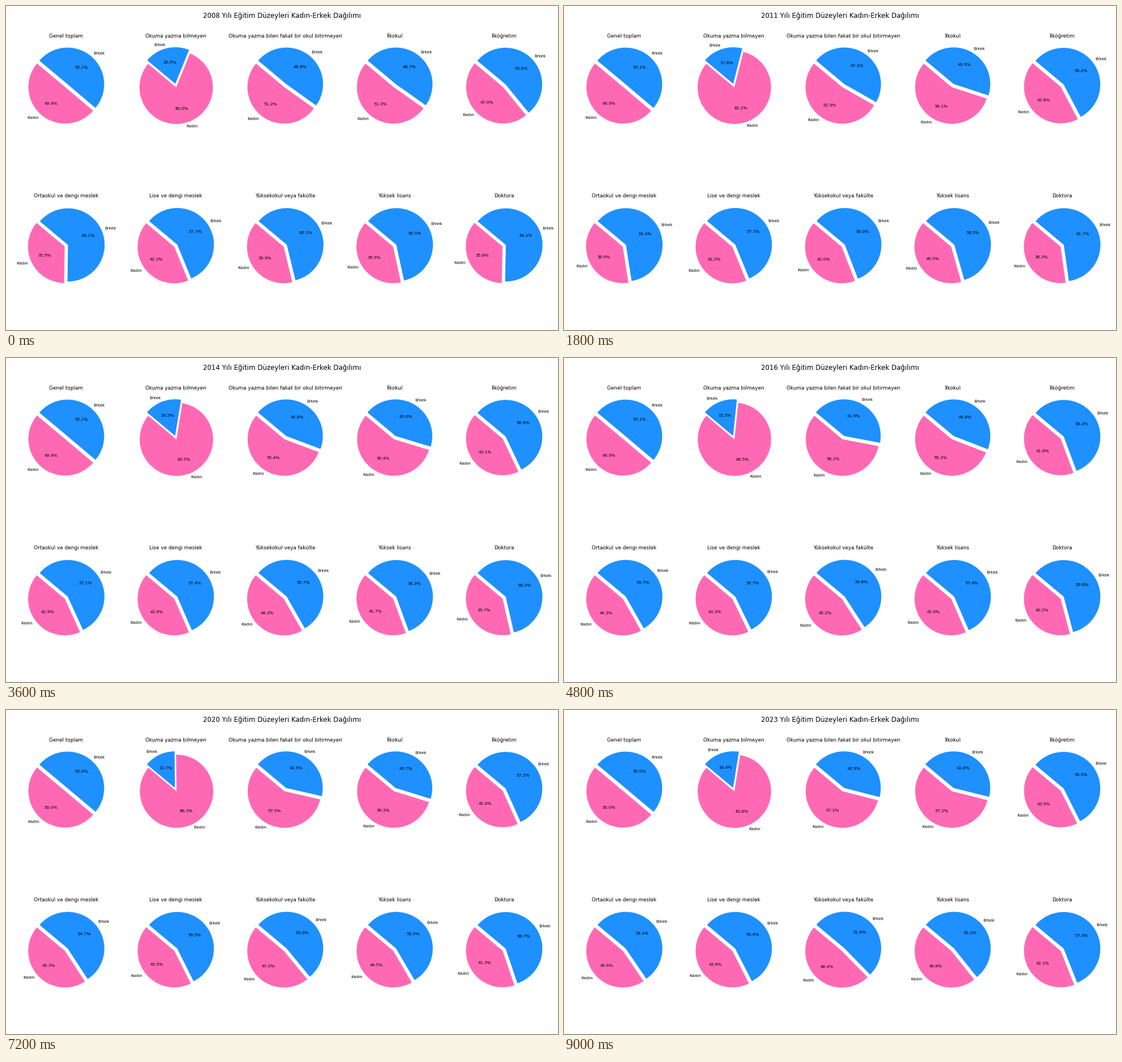
A matplotlib script for the animation above (9.6 s loop, 975x574 px).

```python
import numpy as np
import matplotlib.pyplot as plt
from matplotlib.animation import FuncAnimation

plt.rcParams["font.family"] = "DejaVu Sans"

WIDTH, HEIGHT = 975, 574
SCALE = 0.53                        # type size relative to the usual points
COLORS = ["hotpink", "dodgerblue"]
FIRST_YEAR, LAST_YEAR = 2008, 2023

# Share of women (%) at the turning points; straight lines in between
WOMEN = {
    "Genel toplam": {2008: 49.88, 2023: 49.98},
    "Okuma yazma bilmeyen": {2008: 80.0, 2010: 81.7, 2020: 86.3, 2023: 83.6},
    "Okuma yazma bilen fakat bir okul bitirmeyen":
        {2008: 51.2, 2013: 54.0, 2016: 58.1, 2023: 57.1},
    "İlkokul": {2008: 51.3, 2010: 55.6, 2013: 57.0, 2016: 55.2, 2023: 57.2},
    "İlköğretim": {2009: 47.0, 2010: 43.8, 2013: 43.8, 2016: 41.8, 2023: 43.5},
    "Ortaokul ve dengi meslek":
        {2008: 35.9, 2011: 38.6, 2013: 39.2, 2014: 42.9, 2017: 45.0, 2023: 45.6},
    "Lise ve dengi meslek": {2008: 42.3, 2013: 42.3, 2016: 43.3, 2023: 43.6},
    "Yüksekokul veya fakülte": {2008: 39.9, 2010: 41.0, 2013: 43.9, 2023: 48.4},
    "Yüksek lisans": {2008: 39.5, 2013: 41.2, 2020: 44.5, 2023: 46.8},
    "Doktora": {2008: 35.8, 2010: 37.8, 2013: 39.4, 2023: 42.1},
}


def women_share(level, year):
    points = WOMEN[level]
    return np.interp(year, list(points), list(points.values()))


def add_pie_axes(index, side=162):
    row, col = divmod(index, 5)
    x, y = 106.5 + 193.35 * col, 141 + 283.6 * row
    return fig.add_axes([(x - side / 2) / WIDTH, 1 - (y + side / 2) / HEIGHT,
                         side / WIDTH, side / HEIGHT])


fig = plt.figure(figsize=(WIDTH / 100, HEIGHT / 100), dpi=100, facecolor="white")
axes = [add_pie_axes(i) for i in range(len(WOMEN))]
heading = fig.suptitle("", fontsize=16 * SCALE)


def draw(frame):
    year = FIRST_YEAR + frame
    heading.set_text(f"{year} Yılı Eğitim Düzeyleri Kadın-Erkek Dağılımı")
    for ax, level in zip(axes, WOMEN):
        ax.clear()
        share = women_share(level, year)
        ax.pie([share, 100 - share], labels=["Kadın", "Erkek"], colors=COLORS,
               explode=(0.05, 0.05), startangle=140, autopct="%1.1f%%",
               textprops={"fontsize": 10 * SCALE})
        ax.set_title(level, fontsize=12 * SCALE, pad=6 * SCALE)


animation = FuncAnimation(fig, draw, frames=LAST_YEAR - FIRST_YEAR + 1,
                          init_func=lambda: None, interval=600,
                          repeat=True, repeat_delay=0)
plt.show()
```
